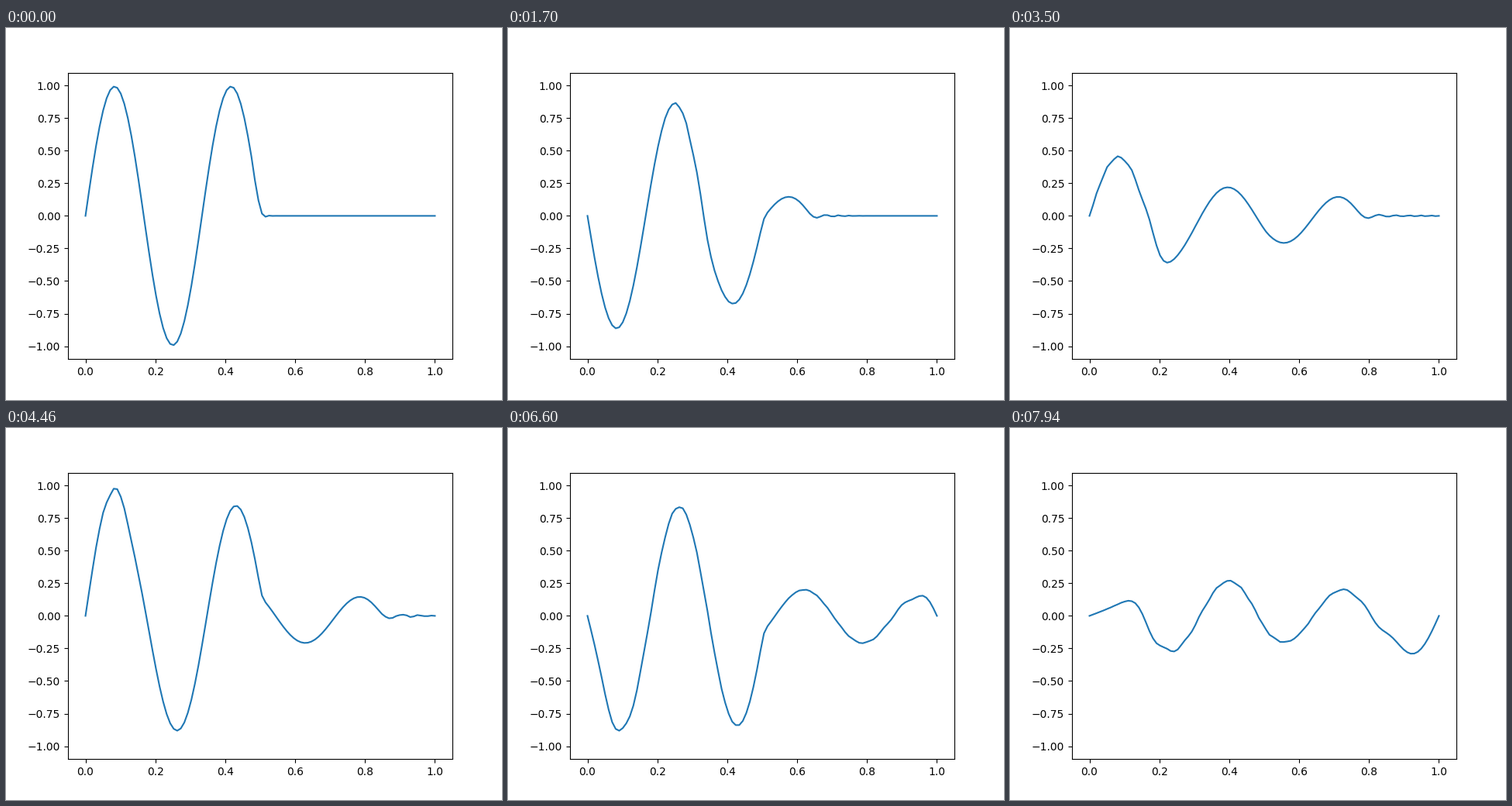
These frames come from a looping animation (640 px wide and 480 px high, 8000 ms). A matplotlib script:

```python
import numpy as np
import matplotlib.pyplot as plt
from matplotlib.animation import FuncAnimation

NODES = 100
TICK = 20            # ms per animation frame
TICKS = 400
COURANT2 = 0.2015    # squared Courant number
PROBE = 50           # node held by a spring and a damper
SPRING, DAMPER = 0.1, 0.418


def tridiag(n, side, centre):
    return centre * np.eye(n) + side * (np.eye(n, k=1) + np.eye(n, k=-1))


def simulate(start, steps):
    """Finite-element wave equation with fixed ends, one row per step."""
    n = NODES - 2
    accel = np.linalg.solve(tridiag(n, 1 / 6, 4 / 6), tridiag(n, -1, 2))
    p = PROBE - 1
    prev = u = start[1:-1].copy()
    rows = np.zeros((steps, NODES))
    for row in rows:
        new = 2 * u - prev - COURANT2 * accel @ u
        new[p] = (new[p] + DAMPER * prev[p] - SPRING * u[p]) / (1 + DAMPER)
        prev, u = u, new
        row[1:-1] = u
    return rows


def step_at(tick):
    """Two steps per six ticks: a short one, then a long one."""
    cycle, part = divmod(tick, 6)
    return 2 * cycle + (part > 0)


x = np.linspace(0, 1, NODES)
start = np.where(x < 0.5, np.sin(6 * np.pi * x), 0)
waves = simulate(start, step_at(TICKS - 1) + 1)

fig, ax = plt.subplots(figsize=(6.4, 4.8), dpi=100)
line, = ax.plot(x, start)
ax.set_xlim(ax.get_xlim())
ax.set_ylim(ax.get_ylim())


def draw(tick):
    line.set_ydata(waves[step_at(tick)])
    return line,


anim = FuncAnimation(fig, draw, frames=TICKS, interval=TICK,
                     repeat=True, repeat_delay=0, blit=False)
plt.show()
```
